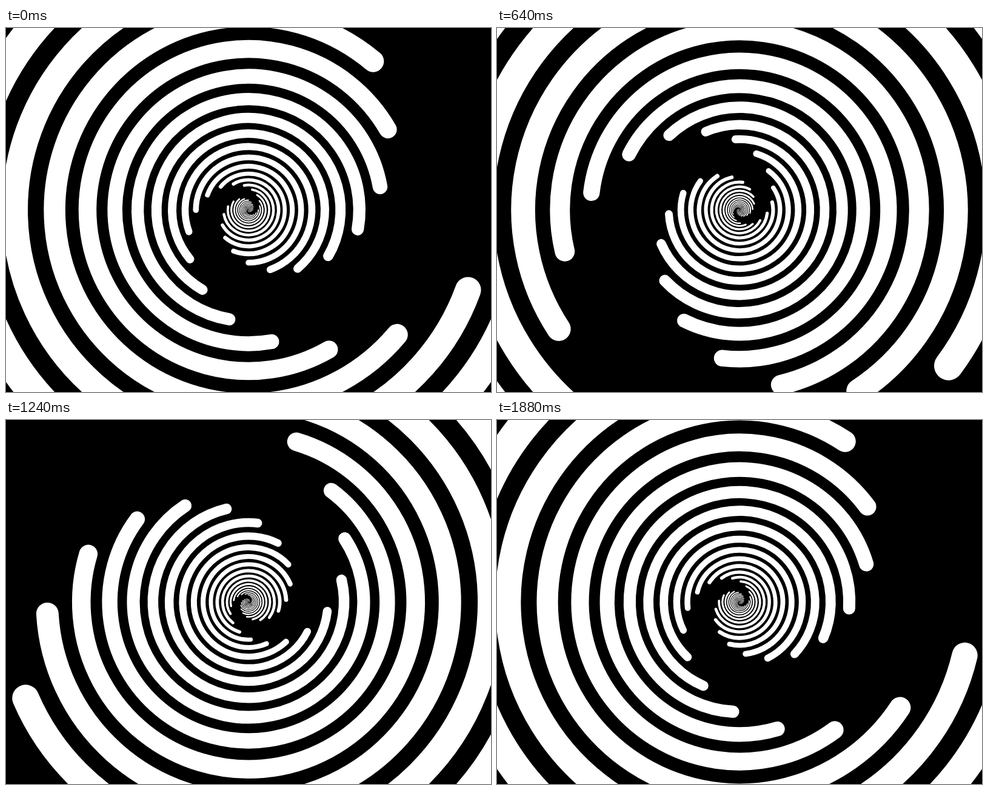
These frames come from a looping animation (800 px wide and 600 px high, 1.92 s). An HTML page with a canvas:

```html
<!DOCTYPE html>
<html>
<head>
<meta charset="utf-8">
<title>Spiral tunnel</title>
<style>
  html, body { margin: 0; height: 100%; overflow: hidden; background: #000; }
  canvas { display: block; }
</style>
</head>
<body>
<canvas id="stage" width="800" height="600"></canvas>
<script>
const ctx = document.getElementById('stage').getContext('2d');
const LOOP = 1920, STEP = 40;
const RATIO = 0.83;        // radius of each ring relative to the next one out
const BASE = 265.5;        // radius of ring 0 at the start of the loop
const THICKNESS = 0.111;   // stroke width relative to the radius
const rad = deg => deg * Math.PI / 180;

function draw(p) {
  // Over one loop each ring takes the place of the ring two further out.
  const zoom = 1 / (1 - (1 - RATIO * RATIO) * p);
  const spin = 320 * p;
  ctx.fillStyle = '#000';
  ctx.fillRect(0, 0, 800, 600);
  ctx.strokeStyle = '#fff';
  ctx.lineCap = 'round';
  for (let n = -4; n < 32; n++) {
    const r = BASE * zoom * RATIO ** n;
    const start = 60 + 20 * n + spin;
    ctx.lineWidth = r * THICKNESS;
    ctx.beginPath();
    ctx.arc(400, 300, r, rad(start), rad(start + 270));
    ctx.stroke();
  }
}

function frame() {
  const t = Math.floor((performance.now() + 1) / STEP) * STEP;
  draw(t % LOOP / LOOP);
  requestAnimationFrame(frame);
}
frame();
</script>
</body>
</html>
```
